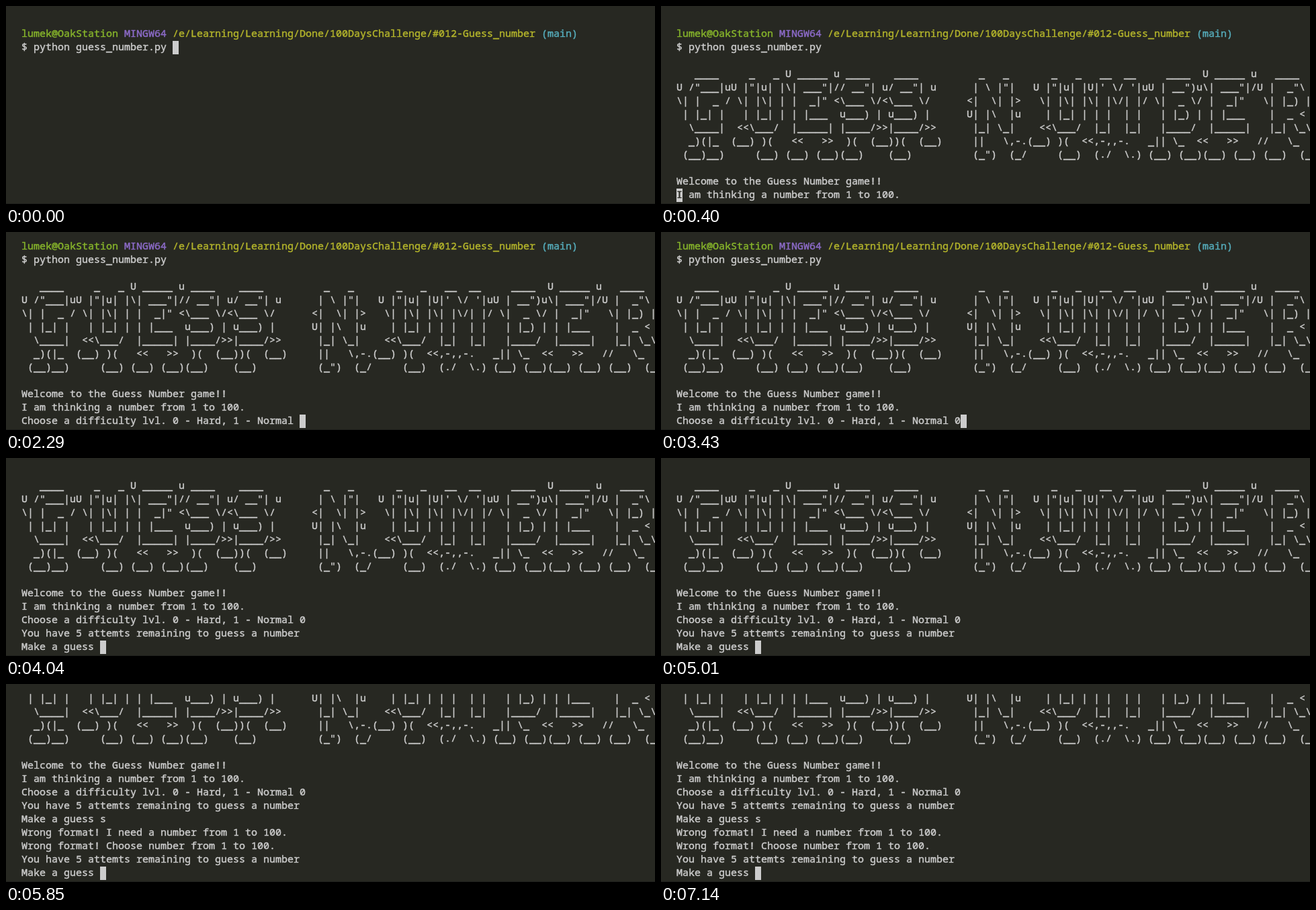
An HTML page with a canvas for the animation above (8 s loop, 966 by 295 pixels).

```html
<!DOCTYPE html>
<html lang="en">
<head>
<meta charset="utf-8">
<title>Guess Number in a terminal</title>
<style>
  html, body { margin: 0; width: 100%; height: 100%; overflow: hidden; background: #272822; }
  canvas { display: block; width: 966px; height: 295px; }
</style>
</head>
<body>
<canvas id="term"></canvas>
<script>
const W = 966, H = 295, LOOP = 8000;
const LEFT = 23, TOP = 12, CELL = 9, ROW = 20, BASELINE = 14, ROWS = 14;
const WEIGHT = 0.45;    // outline that makes the strokes a little heavier
const RULE_DROP = 1;    // underscores sit low in the row
const BG = '#272822', FG = '#cccccc', EDGE = '#1e1f1c';
const GREEN = '#86b42b', PURPLE = '#8c6bc8', YELLOW = '#b3b42b', CYAN = '#56adbc';

const banner = String.raw`
   ____     _   _ U _____ u ____    ____          _   _       _   _   __  __     ____  U _____ u   ____
U /"___|uU |"|u| |\| ___"|// __"| u/ __"| u      | \ |"|   U |"|u| |U|' \/ '|uU | __")u\| ___"|/U |  _"\
\| |  _ / \| |\| | |  _|" <\___ \/<\___ \/      <|  \| |>   \| |\| |\| |\/| |/ \|  _ \/ |  _|"   \| |_) |/
 | |_| |   | |_| | | |___  u___) | u___) |      U| |\  |u    | |_| | | |  | |   | |_) | | |___    |  _ <
  \____|  <<\___/  |_____| |____/>>|____/>>      |_| \_|    <<\___/  |_|  |_|   |____/  |_____|   |_| \_\
  _)(|_  (__) )(   <<   >>  )(  (__))(  (__)     ||   \,-.(__) )(  <<,-,,-.   _|| \_  <<   >>   //   \_
 (__)__)     (__) (__) (__)(__)    (__)          (_")  (_/     (__)  (./  \.) (__) (__)(__) (__) (__)  (__)
`.split('\n').slice(1, -1);

const prompt = [
  ['lumek@OakStation ', GREEN],
  ['MINGW64 ', PURPLE],
  ['/e/Learning/Learning/Done/100DaysChallenge/#012-Guess_number ', YELLOW],
  ['(main)', CYAN]
];
const command = '$ python guess_number.py ';
const level = 'Choose a difficulty lvl. 0 - Hard, 1 - Normal ';
const attempts = 'You have 5 attemts remaining to guess a number';
const guess = 'Make a guess ';

const start = ['', prompt, command];
const intro = [...start, '', ...banner, '',
  'Welcome to the Guess Number game!!',
  'I am thinking a number from 1 to 100.'];
const firstTry = [...intro, level + '0', attempts];
const secondTry = [...firstTry, guess + 's',
  'Wrong format! I need a number from 1 to 100.',
  'Wrong format! Choose number from 1 to 100.',
  attempts];

// The cursor sits at the end of the last line unless a column is given.
const states = [
  { at: 0, lines: start },
  { at: 400, lines: intro, col: 0 },
  { at: 590, lines: [...intro, level] },
  { at: 3430, lines: [...intro, level + '0'] },
  { at: 4040, lines: [...firstTry, guess] },
  { at: 5660, lines: [...firstTry, guess + 's'] },
  { at: 5850, lines: [...secondTry, guess] }
];

const canvas = document.getElementById('term');
const ctx = canvas.getContext('2d');
const ratio = window.devicePixelRatio || 1;
canvas.width = Math.round(W * ratio);
canvas.height = Math.round(H * ratio);
ctx.scale(ratio, ratio);
ctx.font = '15px "Noto Sans Mono", "DejaVu Sans Mono", monospace';
ctx.lineWidth = WEIGHT;
ctx.lineJoin = 'round';

function drawText(text, col, row, color) {
  ctx.fillStyle = ctx.strokeStyle = color;
  [...text].forEach((ch, i) => {
    if (ch === ' ') return;
    const x = LEFT + (col + i) * CELL;
    const y = TOP + row * ROW + BASELINE + (ch === '_' ? RULE_DROP : 0);
    ctx.fillText(ch, x, y);
    ctx.strokeText(ch, x, y);
  });
  return col + text.length;
}

function drawLine(line, row) {
  const spans = typeof line === 'string' ? [[line, FG]] : line;
  spans.reduce((col, [text, color]) => drawText(text, col, row, color), 0);
}

function drawCursor(line, col, row) {
  ctx.fillStyle = FG;
  ctx.fillRect(LEFT + col * CELL, TOP + row * ROW, CELL, ROW);
  drawText(line.charAt(col), col, row, BG);
}

function draw({ lines, col }) {
  ctx.fillStyle = BG;
  ctx.fillRect(0, 0, W, H);
  ctx.fillStyle = EDGE;
  ctx.fillRect(0, H - 1, W, 1);

  const shown = lines.slice(-ROWS);
  shown.forEach(drawLine);
  const last = shown.length - 1;
  drawCursor(shown[last], col ?? shown[last].length, last);
}

const origin = performance.now();
let current;

function tick() {
  const t = (performance.now() - origin) % LOOP;
  const state = states.findLast(s => s.at <= t);
  if (state !== current) draw(current = state);
  requestAnimationFrame(tick);
}
tick();
</script>
</body>
</html>
```
